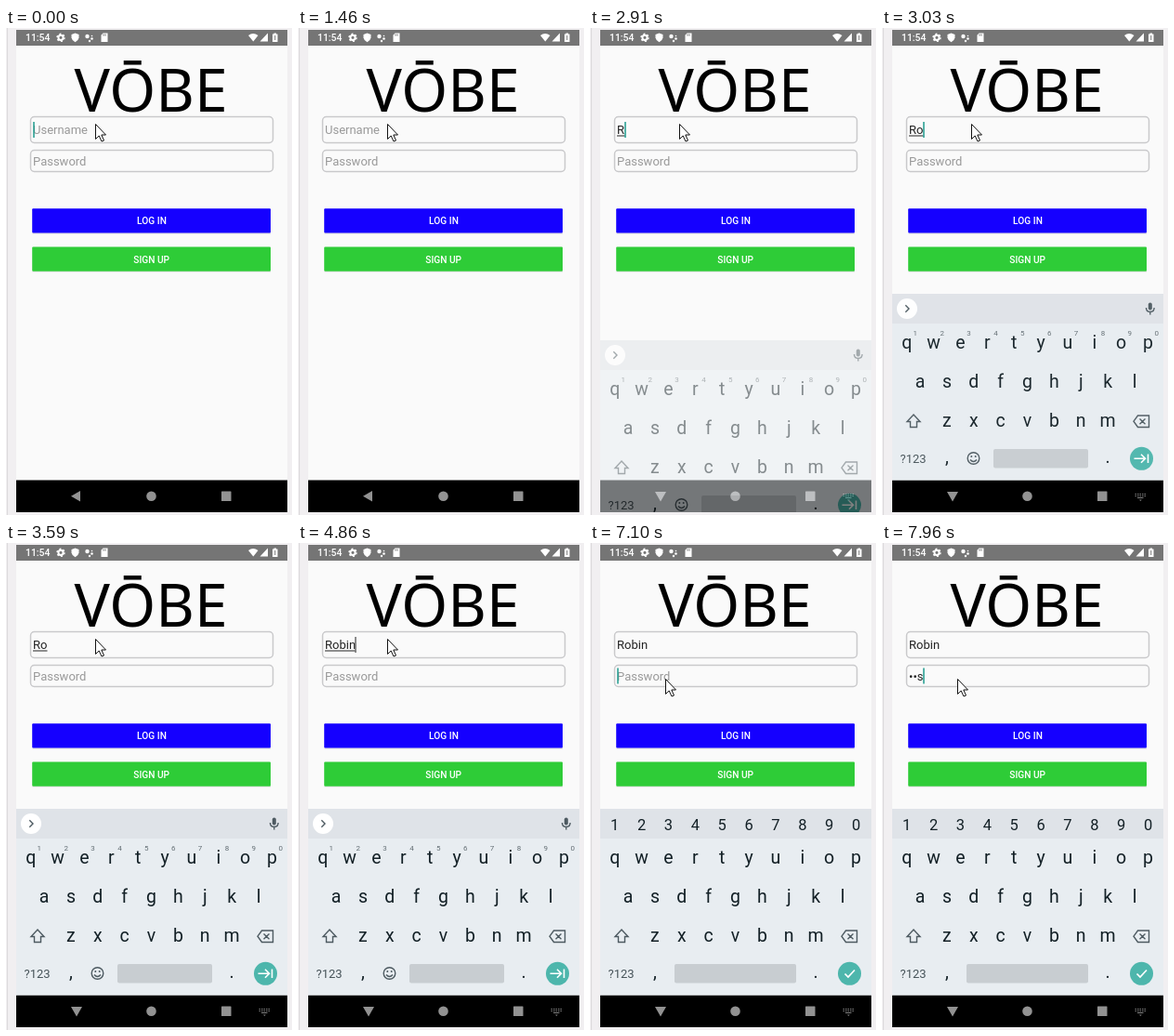
Recreate the animation shown at these times as an HTML page. Size 308 px wide and 524 px high, loop 8000 ms.

```html
<!DOCTYPE html>
<html lang="en">
<head>
<meta charset="utf-8">
<title>Login screen</title>
<style>
html, body { margin: 0; width: 100%; height: 100%; overflow: hidden; background: #f1eff1; }
svg { display: block; width: 100%; height: 100%; }
text { font-family: Roboto, sans-serif; }
.field { fill: #fafafa; stroke: #c9c9cb; stroke-width: 1.5; }
.input { font-size: 13px; fill: #222; }
.label { font-size: 10.2px; font-weight: 500; fill: #fff; text-anchor: middle; }
.key { font-size: 19.5px; fill: #132026; text-anchor: middle; }
.digit { font-size: 16.5px; }
.small { font-size: 13px; fill: #455258; }
.tip { font-size: 8px; fill: #626d73; text-anchor: middle; }
.line { fill: none; stroke: #4d5a61; stroke-width: 1.4; }
</style>
</head>
<body>
<svg viewBox="0 0 308 524">
  <defs><clipPath id="screen"><path d="M11 2H303V521H11Z"/></clipPath></defs>
  <path d="M0 0H308V524H0Z" fill="#f1eff1"/>
  <path d="M1.5 0V524" stroke="#dcdadc"/>
  <path d="M11 2H303V521H11Z" fill="#fafafa"/>

  <!-- status bar -->
  <path d="M11 2H303V19H11Z" fill="#757575"/>
  <g fill="#fff">
    <text x="21" y="14.3" font-size="10.4" font-weight="500">11:54</text>
    <circle cx="59" cy="10.3" r="2.6" fill="none" stroke="#fff" stroke-width="2"/>
    <circle cx="59" cy="10.3" r="4" fill="none" stroke="#fff" stroke-width="1.4" stroke-dasharray="2 2.19"/>
    <path d="M74.5 5.5L78.5 7V10.5Q78 13.500 74.500 15.300Q71 13.500 70.500 10.500V7Z"/>
    <circle cx="87.500" cy="9" r="2.200"/><circle cx="92.500" cy="8.500" r=".8"/>
    <circle cx="92.500" cy="11.500" r="1.300"/><circle cx="90" cy="14" r="1.200"/>
    <path d="M104.500 5.500H109.500V15H102.500V7.800Z"/>
    <path d="M261 8Q266 4 271.500 8L266.300 14.500Z"/>
    <path d="M282 5.500V14.500H273.500Z"/>
    <path d="M288.500 6.500V5.500H291V6.500H292.500V15H287V6.500Z"/>
  </g>
  <path d="M105 6.500V8.500M107 6.500V8.500M289.800 8V13" stroke="#757575"/>

  <!-- login form -->
  <text x="156" y="89.700" text-anchor="middle" font-size="64" style="font-family:'Noto Sans','Open Sans',sans-serif">VŌBE</text>
  <rect class="field" x="26.500" y="95.500" width="261" height="28" rx="4"/>
  <rect class="field" x="26.500" y="131.500" width="261" height="23" rx="4"/>
  <text id="user" class="input" x="29" y="114.200"></text>
  <path id="underline" stroke="#222"/>
  <text id="pass" class="input" x="29" y="147.700"></text>
  <path id="caret" stroke-width="1.500"/>
  <path d="M28.500 221H285M28.500 262H285" stroke="#d5d5d5"/>
  <rect x="28.200" y="194.300" width="256.800" height="26.200" rx="1" fill="#1500ff"/>
  <rect x="28.200" y="235.500" width="256.800" height="26.200" rx="1" fill="#2ecc37"/>
  <text class="label" x="157" y="211.300">LOG IN</text>
  <text class="label" x="156.700" y="252.500">SIGN UP</text>

  <!-- navigation bar -->
  <path d="M11 486.500H303V521H11Z"/>
  <g fill="#929292">
    <path id="back"/>
    <circle cx="156.500" cy="503.700" r="5.300"/>
    <rect x="232" y="498.500" width="10.500" height="10.500" rx=".5"/>
    <g id="kbIcon" fill="none" stroke="#858585">
      <path d="M272.500 501.500H284M272.500 503.500H284" stroke-dasharray="1.500 1"/>
      <path d="M275 505.500H281.500"/>
      <path d="M277 507.500H279.800L278.400 509Z" fill="#858585" stroke="none"/>
    </g>
  </g>

  <g clip-path="url(#screen)">
    <g id="keyboard">
      <path d="M11 286H303V486.500H11Z" fill="#e8edf1"/>
      <path d="M11 286H303V318H11Z" fill="#dfe3e8"/>
      <g id="keys"></g>
      <path class="line" d="M34 416L41 423.500H37.500V429.500H30.500V423.500H27Z"/>
      <path class="line" d="M275.500 417H287.500V429.500H275.500L271 423.200ZM277.500 420.500L283.500 426.200M283.500 420.500L277.500 426.200"/>
      <text class="small" x="19.500" y="467.800">?123</text>
      <rect id="space" y="453" height="20.500" rx="2" fill="#c8cdd1"/>
      <circle cx="279.500" cy="463.300" r="12.500" fill="#4db6ac"/>
      <g id="textMode">
        <circle cx="27" cy="302" r="11" fill="#fff"/>
        <path class="line" d="M25.300 298.300L29 302L25.300 305.700"/>
        <rect x="286.800" y="295.500" width="4" height="8" rx="2" fill="#4d5a61"/>
        <path class="line" d="M284.500 301Q284.500 305.500 288.800 305.500T293.100 301M288.800 305.500V308.500"/>
        <g id="tips"></g>
        <circle class="line" cx="98.500" cy="463" r="6.300"/>
        <path class="line" d="M95 464.500Q98.500 468.500 102 464.500"/>
        <circle cx="96.300" cy="461" r="1" fill="#4d5a61"/><circle cx="100.700" cy="461" r="1" fill="#4d5a61"/>
        <path d="M271.500 463.300H283M279 458.800L283.500 463.300L279 467.800M286.500 458.500V468" fill="none" stroke="#fff" stroke-width="1.600"/>
      </g>
      <g id="passMode">
        <g id="digits"></g>
        <path d="M274.500 463.500L278 467L285 459.500" fill="none" stroke="#fff" stroke-width="1.700"/>
      </g>
    </g>
  </g>
  <path id="pointer" d="M.5 .5V16.500L4.200 13L7 19L9.500 18L6.800 12H11.500Z" fill="#fff" stroke="#111"/>
</svg>
<script>
const $ = id => document.getElementById(id);
const LOOP = 8000, PITCH = 28.87;

function addRow(parent, chars, x, y, cls) {
  [...chars].forEach((char, i) => {
    const el = document.createElementNS('http://www.w3.org/2000/svg', 'text');
    el.setAttribute('class', cls);
    el.setAttribute('x', x + i * PITCH);
    el.setAttribute('y', y);
    el.textContent = char;
    $(parent).append(el);
  });
}
addRow('keys', 'qwertyuiop', 26.7, 345, 'key');
addRow('keys', 'asdfghjkl', 41.1, 386.5, 'key');
addRow('keys', 'zxcvbnm', 69.9, 428.5, 'key');
addRow('keys', ',', 69.9, 468, 'key');
addRow('keys', '.', 243.2, 468, 'key');
addRow('tips', '1234567890', 35.8, 331, 'tip');
addRow('digits', '1234567890', 26.7, 308.5, 'key digit');

// Each track lists [start time, value]; values hold until the next step.
const USER_Y = 101, PASS_Y = 134.5, TEAL = '#1d9a8c';
const on = (x, y, color = TEAL) => ({ x, y, color });
const tracks = {
  caret: [
    [0, on(30, USER_Y)], [470, null], [900, on(30, USER_Y)], [1460, null],
    [2020, on(30, USER_Y)], [2450, null], [2760, on(38, USER_Y)],
    [3030, on(45, USER_Y)], [3590, null], [4020, on(45, USER_Y)], [4580, null],
    [4860, on(62, USER_Y, '#666')], [5440, null], [5830, on(62, USER_Y)],
    [6110, on(30, PASS_Y)], [6690, null], [7100, on(30, PASS_Y)],
    [7680, on(37, PASS_Y)], [7810, on(41, PASS_Y)], [7960, on(45, PASS_Y)]
  ],
  user: [[0, ''], [2760, 'R'], [3030, 'Ro'], [4860, 'Robin']],
  underline: [[0, 0], [2760, 37.5], [3030, 44.5], [4860, 61.5], [6110, 0]],
  pass: [[0, ''], [7680, 'p'], [7810, '•a'], [7960, '••s']],
  pointer: [[0, [96, 103]], [5710, [92, 121]], [5830, [84, 142]], [5980, [81, 146]]],
  keyboard: [[0, [0, 0]], [2910, [50, 0.5]], [3030, [0, 0.96]], [3180, [0, 1]]],
  imeOpen: [[0, false], [1740, true]],
  passMode: [[0, false], [6410, true]]
};
const at = (name, t) => tracks[name].findLast(([start]) => start <= t)[1];
const show = (id, visible) => { $(id).style.display = visible ? '' : 'none'; };

function setInput(id, value, hint) {
  $(id).textContent = value || hint;
  $(id).style.fill = value ? '#222' : '#999';
}

function draw(t) {
  const caret = at('caret', t);
  show('caret', caret);
  if (caret) {
    $('caret').setAttribute('d', `M${caret.x} ${caret.y}v17`);
    $('caret').setAttribute('stroke', caret.color);
  }
  setInput('user', at('user', t), 'Username');
  setInput('pass', at('pass', t), 'Password');

  const end = at('underline', t);
  show('underline', end);
  $('underline').setAttribute('d', `M29 116H${end}`);
  $('pointer').setAttribute('transform', `translate(${at('pointer', t)})`);

  const [drop, opacity] = at('keyboard', t);
  $('keyboard').setAttribute('transform', `translate(0 ${drop})`);
  $('keyboard').setAttribute('opacity', opacity);

  const imeOpen = at('imeOpen', t), passMode = at('passMode', t);
  $('back').setAttribute('d', imeOpen ? 'M70 499H82L76 509.500Z' : 'M80 498V509.500L70 503.700Z');
  show('kbIcon', imeOpen);
  show('textMode', !passMode);
  show('passMode', passMode);
  const left = passMode ? 91 : 120;
  $('space').setAttribute('x', left);
  $('space').setAttribute('width', 222 - left);
}

const begin = performance.now();
function tick() {
  draw((performance.now() - begin) % LOOP);
  requestAnimationFrame(tick);
}
tick();
</script>
</body>
</html>
```
